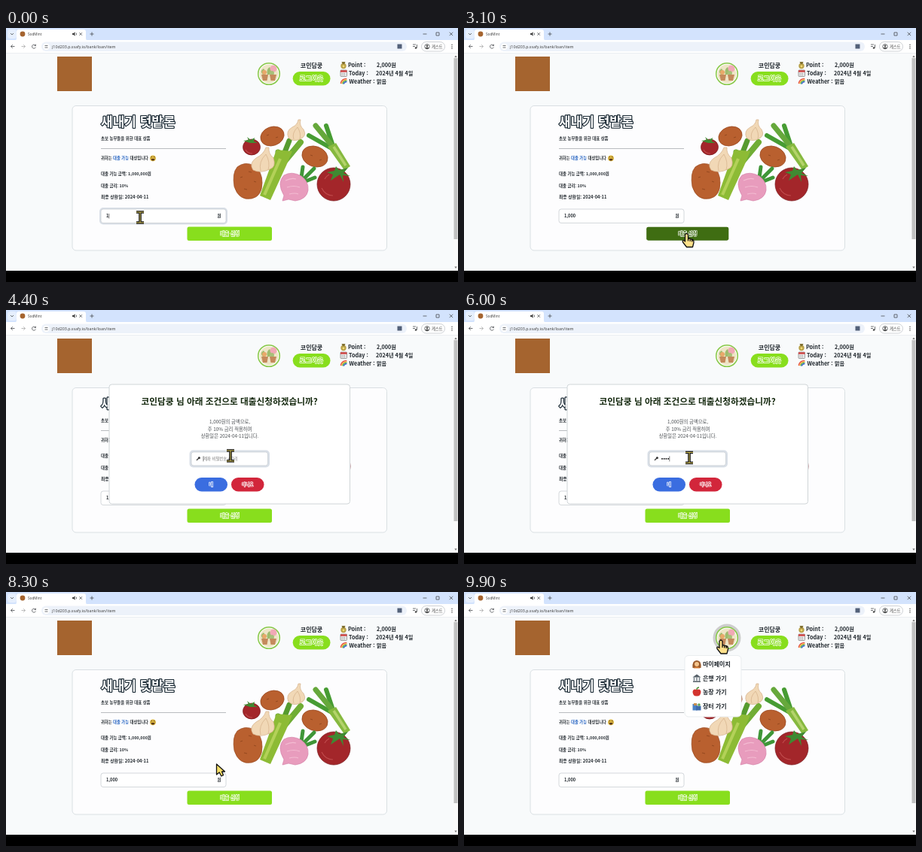
Write an HTML page that moves like this. It is 600 by 338 pixels and loops after 10 s.

```html
<!DOCTYPE html>
<html lang="ko">
<head>
<meta charset="utf-8">
<title>Loan application</title>
<style>
  html, body { margin: 0; width: 100%; height: 100%; overflow: hidden; background: #fff; }
  svg { display: block; width: 100vw; height: 100vh; }
  text { font: 700 5.4px "Noto Sans CJK KR", "Noto Sans CJK", "Noto Sans KR", sans-serif; fill: #20272d; white-space: pre; }
  .browser { font: 400 5.3px "Noto Sans", "Noto Sans CJK KR", sans-serif; fill: #444; }
  .icon { fill: none; stroke: #4a4d51; stroke-width: .8; }
  .info text { font-size: 7.2px; }
  .menu text { font-size: 8px; }
  .mid { text-anchor: middle; }
  .button rect { fill: currentColor; }
  .button text { font-size: 6.5px; fill: currentColor; stroke: #fff; stroke-width: 1.3px; paint-order: stroke; text-anchor: middle; stroke-linejoin: round; }
  .title { font-size: 17px; fill: #fff; stroke: #1c2b36; stroke-width: 2px; paint-order: stroke; stroke-linejoin: round; filter: drop-shadow(.8px .8px 0 #1c2b36); }
  .terms text { font-size: 6.3px; font-weight: 400; fill: #484c50; text-anchor: middle; }
  .field { fill: #fff; stroke: #c9ced3; stroke-width: .8; }
  .glow { fill: none; stroke: #d9dfe7; stroke-width: 3; }
  .caret { stroke: #222; stroke-width: .6; }
</style>
</head>
<body>
<svg viewBox="0 0 600 338" preserveAspectRatio="none">
  <!-- Browser window -->
  <rect width="600" height="338" fill="#f8fafb"/>
  <rect width="600" height="17" fill="#d3e3fd"/>
  <rect x="2" y="2" width="12" height="12" rx="3.5" fill="#e6effd"/>
  <path d="M11 17Q14 17 14 13V5Q14 2 17 2H103Q106 2 106 5V13Q106 17 109 17Z" fill="#fff"/>
  <circle cx="22" cy="8" r="3.4" fill="#a5642f"/>
  <text class="browser" x="29" y="10" style="font-size:4.7px">SodMint</text>
  <path d="M88 7h1.5l2-1.7v5.4l-2-1.7H88z" fill="#444"/>
  <path class="icon" d="M6 7l2 2 2-2M93 6.5q1.2 1.5 0 3M97.4 6.2l3.6 3.6m0-3.6-3.6 3.6M111.500 8h5M114 5.5v5M553.500 8h5M571 6h4v4h-4zM588.700 5.700l4.400 4.400m0-4.400-4.400 4.400"/>
  <rect y="16" width="600" height="17.500" fill="#fff"/>
  <rect x="47" y="18.500" width="485" height="12.500" rx="6.200" fill="#edf2fa"/>
  <circle cx="53.500" cy="24.700" r="4.300" fill="#fff"/>
  <path class="icon" d="M11.500 24.500H6.500m2.300-2.300-2.300 2.300 2.300 2.300M51.500 23.500h4M51.500 26h4M39.200 23.300a2.500 2.500 0 1 0 .2 2.300M39.400 21.700v1.900h-1.900M540 22h4M540 24.500h3M545.500 22v4.500"/>
  <path class="icon" d="M20.500 24.500h5m-2.300-2.300 2.300 2.300-2.300 2.300" style="stroke:#aaa"/>
  <text class="browser" x="61" y="26.600">j10d203.p.ssafy.io/bank/loan/item</text>
  <rect x="519.500" y="21.500" width="6" height="6" fill="#536179"/>
  <circle cx="544" cy="26.500" r="1.200" fill="#444"/>
  <rect x="551.500" y="18.500" width="31" height="12.500" rx="6.200" fill="#fff" stroke="#b9bdc3" stroke-width=".7"/>
  <circle class="icon" cx="559" cy="24.700" r="3.200"/>
  <circle cx="559" cy="23.700" r="1.200" fill="#444"/>
  <path d="M556.800 26.800q2.200-2.400 4.400 0-2.200 1.800-4.400 0z" fill="#444"/>
  <text class="browser" x="565" y="26.600">게스트</text>
  <path d="M592 21.800v6" stroke="#444" stroke-width="1.200" stroke-dasharray="1.200 1.200"/>
  <path d="M0 33.500H600" stroke="#e6e9ed" stroke-width=".7"/>
  <rect x="594" y="34" width="6" height="289" fill="#fafafa"/>
  <rect x="594.500" y="40" width="5" height="241" fill="#c1c1c1"/>
  <path d="M595.300 39 597 36.500 598.700 39zM595.300 317.500 597 320 598.700 317.500z" fill="#777"/>
  <rect y="323" width="600" height="15"/>

  <!-- Page header -->
  <rect x="68" y="38" width="46" height="46" fill="#a5642f"/>
  <circle id="avatarHover" cx="349" cy="61" r="18.500" fill="#cdcdcd"/>
  <circle cx="349" cy="61" r="14.300" fill="#fff" stroke="#86c846" stroke-width="1.500"/>
  <circle cx="349" cy="61" r="12.500" fill="#eee5c6"/>
  <path d="M341 62q-5-5 1-8 3 3 1 8zM347 62q-2-7 3-10 4 5 0 10z" fill="#9dbb6d"/>
  <circle cx="355" cy="54" r="4.500" fill="#f1a9b6"/>
  <circle cx="343" cy="59" r="3" fill="#e9a86a"/>
  <circle cx="353" cy="60" r="3" fill="#a8c07a"/>
  <path d="M339 62h9l-1.500 8h-5.500zM350 62h9l-2 8h-5.500z" fill="#c48a5c"/>
  <text class="mid" x="405.500" y="53" style="font-size:8px">코인담쿵</text>
  <g class="button" style="color:#88de1d"><rect x="380.700" y="58" width="49.800" height="18.500" rx="9.200"/><text x="405.500" y="70.300" style="font-size:8.500px">로그아웃</text></g>
  <g class="info">
    <circle cx="448" cy="50.500" r="3.700" fill="#b9a24a"/><path d="M445.500 45h5l-1.300 3h-2.400z" fill="#807030"/><circle cx="448" cy="51" r="1.400" fill="#f2da73"/>
    <rect x="444" y="56" width="8.500" height="8.500" rx="1" fill="#eee" stroke="#777" stroke-width=".7"/><path d="M444 57.500h8.500" stroke="#cf4545" stroke-width="2.500"/><path d="M445.500 60.500h5.500M445.500 62.500h5.500" stroke="#777" stroke-width=".8" stroke-dasharray="1 .8"/>
    <g fill="none" stroke-width="1.300"><path d="M444.300 74q1-6.500 8-6.500" stroke="#e54d3d"/><path d="M445.600 74.200q1-5 6.800-5.300" stroke="#f2b02f"/><path d="M446.900 74.400q1-4 5.500-4.200" stroke="#44aa55"/><path d="M448.200 74.600q1-3 4.200-3.100" stroke="#4467cb"/></g>
    <text x="454" y="52">Point :</text><text x="492" y="52">2,000원</text>
    <text x="455" y="63">Today :</text><text x="491" y="63">2024년 4월 4일</text>
    <text x="455.500" y="74">Weather :</text><text x="492" y="74">맑음</text>
  </g>

  <!-- Loan card -->
  <rect x="88" y="103.500" width="417.500" height="192.500" rx="5" fill="#fdfdfe" stroke="#d6dde0" stroke-width=".9"/>
  <text class="title" x="126" y="131">새내기 텃밭론</text>
  <text x="126" y="149">초보 농부들을 위한 대표 상품</text>
  <path d="M126 160.500H292" stroke="#b9bcbf" stroke-width="1"/>
  <text x="126" y="175.300" style="font-size:5.300px">귀하는 <tspan fill="#2060c0">대출 가능</tspan> 대상입니다</text>
  <circle cx="195" cy="173.300" r="3.900" fill="#d9b43f"/>
  <path d="M192.500 174h5q-.5 2.700-2.500 2.700t-2.500-2.700z" fill="#5b3a1c"/><path d="M192.500 172l1.500-.7M197.500 172l-1.500-.7" stroke="#5b3a1c" stroke-width=".8"/>
  <text x="126" y="195.500">대출 가능 금액: 1,000,000원</text>
  <text x="126" y="211.500">대출 금리: 10%</text>
  <text x="126" y="227.200" style="font-size:5.800px">최종 상환일: 2024-04-11</text>
  <rect id="amountGlow" class="glow" x="125.500" y="240.500" width="167" height="19.500" rx="3.500"/>
  <rect class="field" x="126" y="241" width="166" height="18.500" rx="3"/>
  <text id="amount" x="133" y="252.300" style="font-size:5.600px"></text>
  <path id="amountCaret" class="caret" d="M0 247v6.500"/>
  <text x="280.500" y="252.300">원</text>
  <g id="apply" class="button"><rect x="240.500" y="264.500" width="112.500" height="18.500" rx="2.500"/><text x="297" y="276">대출 신청</text></g>

  <!-- Vegetables -->
  <g stroke-linecap="round" fill="none">
    <path d="M363 180 361 165M365 178 376 150" stroke="#569b2f" stroke-width="7"/>
    <path d="M367 181 391 152" stroke="#70ad35" stroke-width="8"/>
    <path d="M432 160 402 143M434 157 425 130" stroke="#479c33" stroke-width="6"/>
    <path d="M434 158 411 130" stroke="#66a83b" stroke-width="7"/>
  </g>
  <path d="M337 223 351 229 372 183 380 164 359 162Z" fill="#8dbb35"/>
  <path d="M343 222 364 174" stroke="#b3d158" stroke-width="4"/>
  <path d="M427 158 438 153 457 184 449 189Z" fill="#86b93f"/>
  <path d="M451 183 435 158" stroke="#b4d36c" stroke-width="3.500"/>
  <g stroke="#98481f" stroke-width=".7" fill="#b9602f">
    <ellipse cx="353.500" cy="144" rx="16" ry="12.500" transform="rotate(-20 353.500 144)"/>
    <ellipse cx="410" cy="171" rx="17.500" ry="13.500" transform="rotate(20 410 171)"/>
    <path d="M307 185q10-8 22-2 11 7 11 23 0 18-14 21-17 3-23-16-3-18 4-26z"/>
  </g>
  <path d="M311 199l3-1m8-7 4 1m-10 22 4 1m9-11 3 1M346 143l3-1m9 4 3-1M404 169l3 1m9 6 3-1" stroke="#95491f" stroke-width="1"/>
  <g fill="#f1d8b6" stroke="#d4b08a" stroke-width=".7">
    <path d="M391 122q-2 8 4 13 5 9-5 13-9 4-15-2-4-9 5-14 7-3 8-10z"/>
    <path d="M349 159q-1 8 6 14 4 12-5 15-12 6-22 1-6-9 4-16 10-5 13-14z"/>
    <path d="M387 132q-8 8-5 16m5-16q5 8 3 16M345 168q-10 10-7 22m7-22q6 10 3 21" fill="none"/>
  </g>
  <g fill="#a3262a" stroke="#79191d" stroke-width=".7">
    <ellipse cx="326" cy="158.500" rx="11.500" ry="10.500"/><ellipse cx="435" cy="208" rx="22" ry="22"/>
  </g>
  <g fill="#3f8a32"><path d="M324 153l-9-3 7-1-2-4 5 4 5-3-1 5 5 2zM443 195l-12 8 3-8-8-3 10-2 2-6 4 5 12-3-6 7 9 4-10-1 1 9z"/></g>
  <path d="M419 213q5 10 15 10M423 201q2-4 6-6M318 162q3 5 9 5" fill="none" stroke="#bf4a4c" stroke-width="1.200"/>
  <path d="M392 199 394 185M394 202 409 187M395 205 410 199" stroke="#3f9638" stroke-width="5" stroke-linecap="round"/>
  <path d="M369 196q10-6 23 1 10 7 9 19-2 12-17 14l-9-2-8 2 2-7q-10-17 0-27z" fill="#e89cbd" stroke="#d683a9" stroke-width=".7"/>
  <path d="M371 203q8-4 14-2M373 212q9-3 17 0M376 221q8-2 12 0" stroke="#f3bcd2" stroke-width="1.200" fill="none"/>

  <!-- Confirmation dialog -->
  <g id="dialog">
    <rect x="137" y="99" width="319.500" height="159" rx="3.500" fill="#fff" stroke="#d0d5d8" stroke-width="1"/>
    <text class="mid" x="296.700" y="125.600" style="font-size:11.700px;fill:#15290f">코인담쿵 님 아래 조건으로 대출신청하겠습니까?</text>
    <g class="terms"><text x="297" y="151.300">1,000원의 금액으로,</text><text x="297" y="160.700">주 10% 금리 적용하며</text><text x="297" y="170.200">상환일은 2024-04-11입니다.</text></g>
    <rect id="pinGlow" class="glow" x="245" y="188" width="103.500" height="20" rx="3.500"/>
    <rect class="field" x="246" y="189" width="101.500" height="18" rx="3"/>
    <path d="M253 200 256 197" stroke="#333" stroke-width="1.200"/><circle cx="256.400" cy="196.800" r="1.500" fill="#333"/>
    <text id="hint" x="262" y="200" style="font-weight:400;fill:#777">계좌 비밀번호 4자리</text>
    <g id="dots" fill="#222"><circle cx="263" cy="198" r="1"/><circle cx="265.700" cy="198" r="1"/><circle cx="268.400" cy="198" r="1"/><circle cx="271.100" cy="198" r="1"/></g>
    <path id="pinCaret" class="caret" d="M0 194.500v7"/>
    <g id="yes" class="button"><rect x="250.500" y="223" width="43.500" height="18.500" rx="9.200"/><text x="272.300" y="234.300" style="font-size:6px">네</text></g>
    <g class="button" style="color:#d2263b"><rect x="299" y="223" width="43.500" height="18.500" rx="9.200"/><text x="320.700" y="234.300" style="font-size:5.500px">아니오</text></g>
  </g>

  <!-- Profile menu -->
  <g id="menu" class="menu">
    <rect x="293" y="84.500" width="75" height="81.500" rx="5" fill="#fff" stroke="#e9edef" stroke-width="1"/>
    <path d="M303.500 101q-1-10 5.500-10t5.500 10z" fill="#9b5b2c"/><circle cx="309" cy="96" r="3" fill="#f4c48c"/><path d="M304.500 101.500q4.500-4.500 9 0z" fill="#d57a32"/>
    <path d="M303.500 113.500 309 109.500 314.500 113.500zM304 118.500h10v1.500h-10z" fill="#555f67"/><path d="M305.500 113.500v5m3.500-5v5m3.500-5v5" stroke="#78838b" stroke-width="1.500"/>
    <path d="M309 130q-5-2-5.500 3 .5 6 5.500 5.500 5 .5 5.500-5.500-.5-5-5.500-3z" fill="#d3342f"/><path d="M309 130q0-3 3-3" stroke="#4c8f34" stroke-width="1.400" fill="none"/>
    <path d="M303.500 149h6v8.500h-6z" fill="#4b82c6"/><path d="M308 151.500h6.500v6H308z" fill="#3f6ba9"/><path d="M305 148h4v3h-4z" fill="#c98f4d"/><circle cx="312" cy="150" r="1.800" fill="#62a553"/>
    <text x="317" y="99">마이페이지</text><text x="317" y="118">은행 가기</text><text x="317" y="136.300">농장 가기</text><text x="317" y="155.200">장터 가기</text>
  </g>

  <!-- Pointer shapes, hotspot at 0,0 -->
  <g id="pointer" stroke="#111" stroke-linejoin="round">
    <path id="arrow" d="M0 0V14L3.700 11 6.300 16 9 14.700 7 10H11Z" fill="#f7e06a" stroke-width="1.300"/>
    <path id="hand" d="M-2 1.500Q0-1.500 2 1.500V6.500L6 7.500Q10 8 9.500 12L8 18H0L-5 11.500Q-6 8.500-3.500 9.300L-2 10.500ZM2 6.500V10M4.700 7.500V10.500M7.200 8.300V11" fill="#ffe08a" stroke-width="1.300"/>
    <g id="ibeam" fill="none"><path d="M-5-7H5M-5 7H5M0-7V7" stroke-width="3.600"/><path d="M-5-7H5M-5 7H5M0-7V7" stroke="#d9c65c" stroke-width="1"/></g>
  </g>
</svg>
<script>
const LOOP = 10000;
const $ = id => document.getElementById(id);
const show = (id, on) => { $(id).style.display = on ? '' : 'none'; };
const clamp = x => Math.min(1, Math.max(0, x));
const ease = x => x * x * (3 - 2 * x);
const lerp = (a, b, p) => a + (b - a) * p;

// Latest value of a list of [time, value] steps
const stepAt = (steps, t) => steps.filter(s => s[0] <= t).pop()[1];

const amountSteps = [[0, '1'], [600, '10'], [800, '100'], [1000, '1,000']];
const pinSteps = [[0, 0], [4600, 1], [4800, 2], [5600, 3], [5800, 4]];
const path = [
  [0, 178, 252], [2000, 178, 252], [2700, 295.5, 273.5], [3300, 295.5, 273.5],
  [4000, 298, 194], [4400, 298, 194], [4600, 299, 196.5], [6300, 299, 196.5],
  [7300, 279.5, 229], [8500, 279.5, 229], [9000, 299, 207], [9600, 341, 64], [LOOP, 341, 64]
];

function pointerAt(t) {
  const i = path.findIndex(k => k[0] > t);
  const [a, b] = [path[i - 1], path[i]];
  const p = ease((t - a[0]) / (b[0] - a[0]));
  return [lerp(a[1], b[1], p), lerp(a[2], b[2], p)];
}

// Overshooting entrance: 0.7, 1.05, 0.95, 1
function popScale(p) {
  if (p < .45) return lerp(.7, 1.05, p / .45);
  if (p < .8) return lerp(1.05, .95, (p - .45) / .35);
  return lerp(.95, 1, clamp((p - .8) / .2));
}

function scaleAbout(id, x, y, s) {
  $(id).setAttribute('transform', `translate(${x} ${y}) scale(${s}) translate(${-x} ${-y})`);
}

function moveCaret(id, x, on) {
  show(id, on);
  $(id).setAttribute('transform', `translate(${x} 0)`);
}

function draw(t) {
  const [x, y] = pointerAt(t);
  const over = (left, top, right, bottom) => x >= left && x <= right && y >= top && y <= bottom;
  const open = t >= 3300 && t < 7950;
  const overApply = over(240.5, 264.5, 353, 283);
  const overYes = open && over(250.5, 223, 294, 241.5);
  const overAvatar = Math.hypot(x - 349, y - 61) < 15;
  const overField = open ? over(245, 188, 348, 208) : over(126, 241, 292, 260);

  const amountFocused = t < 3000;
  $('amount').textContent = stepAt(amountSteps, t);
  show('amountGlow', amountFocused);
  moveCaret('amountCaret', 133.4 + $('amount').getComputedTextLength(),
    t < 1400 || t >= 2000 && t < 2500);

  $('apply').style.color = overApply ? '#3f6d12' : '#88de1d';
  scaleAbout('apply', 296.7, 273.7, t >= 3000 && t < 3250 ? .97 : 1);

  show('dialog', open);
  const closing = clamp((t - 7800) / 150);
  scaleAbout('dialog', 296.7, 178.5, popScale((t - 3300) / 300) * (1 - closing / 2));
  $('dialog').style.opacity = clamp((t - 3300) / 100) * (1 - closing);
  const count = stepAt(pinSteps, t);
  show('pinGlow', t >= 4200);
  show('hint', !count);
  [...$('dots').children].forEach((dot, i) => { dot.style.opacity = i < count ? 1 : 0; });
  const blinkOn = t < 5300 || t >= 5600 && (t < 5800 || Math.floor((t - 5800) / 500) % 2 === 0);
  moveCaret('pinCaret', 262 + count * 2.7, t >= 4200 && blinkOn);
  $('yes').style.color = overYes ? '#c9c9c9' : '#3a6de0';

  show('avatarHover', overAvatar);
  show('menu', t >= 9650);

  const shape = overField ? 'ibeam' : overApply || overYes || overAvatar ? 'hand' : 'arrow';
  for (const id of ['arrow', 'hand', 'ibeam']) show(id, id === shape);
  $('pointer').setAttribute('transform', `translate(${x} ${y})`);
}

const start = performance.now();
function tick() {
  draw((performance.now() - start) % LOOP);
  requestAnimationFrame(tick);
}
tick();
</script>
</body>
</html>
```
